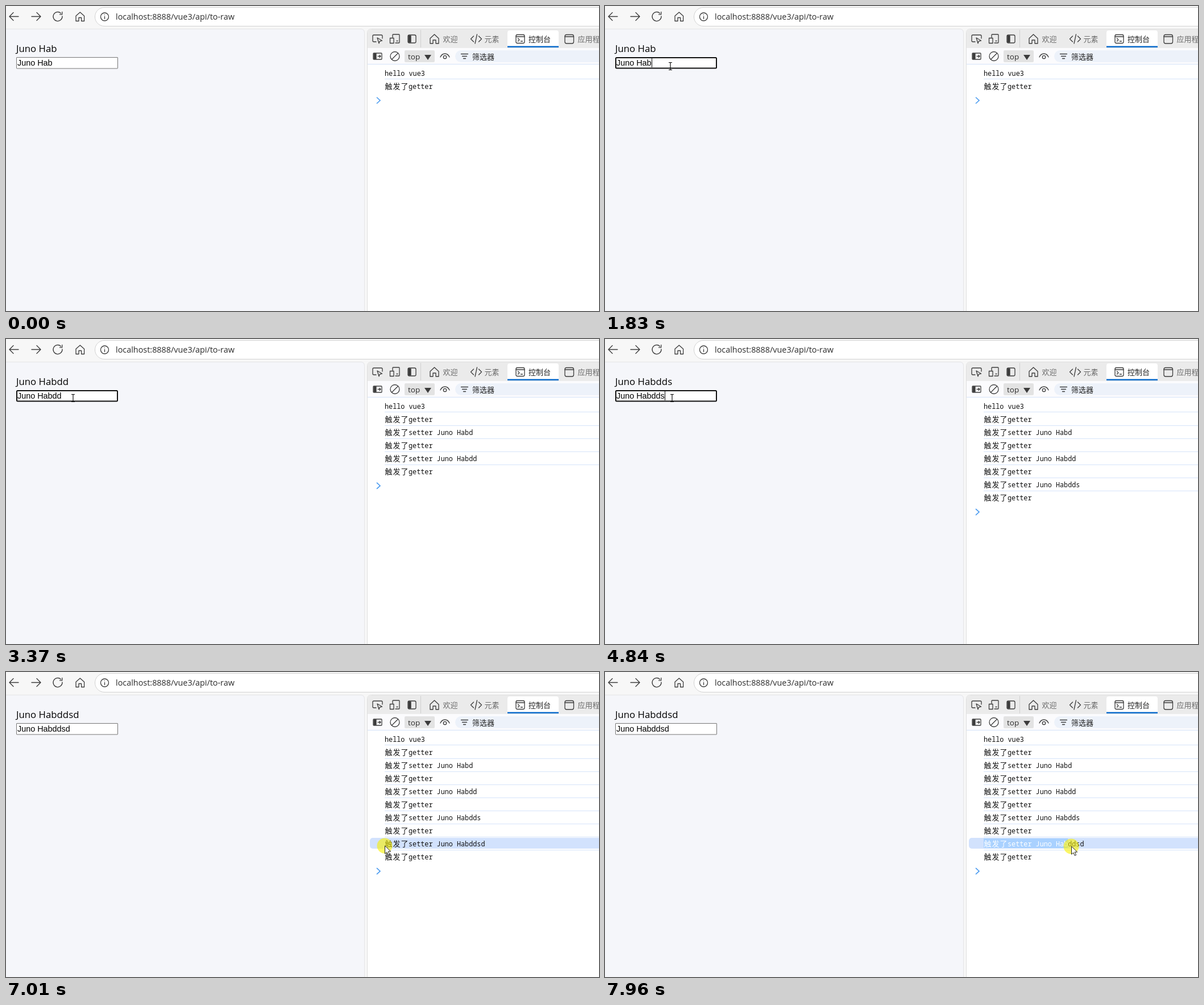
Write an HTML page that moves like this. It is 1043x537 px and loops after 8000 ms.

```html
<!DOCTYPE html>
<html lang="zh">
<head>
<meta charset="utf-8">
<title>to-raw</title>
<style>
html, body { margin: 0; width: 100%; height: 100%; overflow: hidden; background: #f7f7f7; }
svg { display: block; width: 1043px; height: 537px; }
text { fill: #111; white-space: pre; }
.ui { font: 14.4px "Open Sans", "Noto Sans", sans-serif; fill: #2c2c2c; }
.label { font: 16.8px "Open Sans", "Noto Sans", sans-serif; fill: #000; }
.field { font: 14.4px "Liberation Sans", Arial, sans-serif; fill: #000; }
.cn { font: 13px "Noto Sans CJK SC", "Noto Sans CJK", sans-serif; fill: #6a6a6a; }
.dark { fill: #222; }
.log { font: 11.8px "Noto Sans Mono", monospace; }
.han { font: 300 13px "Noto Sans CJK SC", "Noto Sans CJK", sans-serif; letter-spacing: 1px; }
.white text { fill: #fff; }
.icon { fill: none; stroke: #3c3c3c; stroke-width: 1.3; stroke-linecap: round; stroke-linejoin: round; }
</style>
</head>
<body>
<svg viewBox="0 0 1043 537">
  <rect width="1043" height="537" fill="#f7f7f7"/>
  <rect id="hover" x="75" y="2" width="34" height="34" rx="4" fill="#e8e8e8"/>
  <rect x="156.5" y="2.5" width="920" height="33" rx="16.5" fill="#fff" stroke="#d2d2d2"/>
  <g class="icon">
    <path d="M22 18.5H6m7-7-7 7 7 7M45 18.5h16m-7-7 7 7-7 7"/>
    <path id="reload" d="M99 18a8 8 0 1 1-2.5-5.3M98.8 10.5v4.3h-4.3"/>
    <path id="stop" d="M85 12.5l13 13m0-13-13 13"/>
    <path d="M123 17.5l7.3-6.5 7.3 6.5v9h-5v-6h-4.600v6h-5z"/>
    <circle cx="173.500" cy="19" r="7"/>
    <path d="M173.500 18.500v4m0-7v.1"/>
  </g>
  <text class="ui" x="193" y="24">localhost:8888/vue3/api/to-raw</text>

  <path d="M-1 40.500H624q6.500 0 6.500 7V538H-1z" fill="#f5f6fa" stroke="#e4e4e6"/>
  <text id="label" class="label" x="18" y="81"></text>
  <rect id="box" fill="#fff"/>
  <text id="field" class="field" x="20" y="105"></text>
  <rect id="caret" y="92" width="1" height="16"/>

  <path d="M635.500 538V48q0-7.500 7-7.500H1044V538z" fill="#fff" stroke="#dedede"/>
  <path d="M636 74V48q0-7 7-7H1043V74z" fill="#ebebeb"/>
  <path d="M882 73V47q0-4 4-4h82q4 0 4 4v26z" fill="#fff"/>
  <rect x="882" y="70.500" width="90" height="2.500" fill="#0b6bcb"/>
  <rect x="636" y="74" width="407" height="28" fill="#fbfbfd"/>
  <path d="M636 102.500H1043" stroke="#d5e3f8"/>
  <path d="M729.500 42v31" stroke="#cfcfcf"/>
  <rect x="701" y="78" width="53" height="21" rx="2" fill="#e3e3e3"/>
  <rect x="790" y="78" width="300" height="21" rx="10.500" fill="#edf2fa"/>
  <g class="icon">
    <path d="M651 63h-4q-2 0-2-2v-8q0-2 2-2h13q2 0 2 2v4M653 56l8.500 5-4 .8-1.500 4z"/>
    <path d="M680 55v-4q0-1 1-1h10q1 0 1 1v13q0 1-1 1h-6M675.500 56.500h6.500v9h-6.500zM687 61.500h2"/>
    <rect x="707" y="51" width="14" height="14" rx="2.500"/>
    <path d="M708 52.500h4v11h-4z" fill="#3c3c3c"/>
    <path d="M746 57l7.500-7 7.500 7v9h-5v-6h-5v6h-5z"/>
    <path d="M822.500 53l-5 5 5 5m9-10 5 5-5 5m-3-13-3.500 16"/>
    <rect x="897" y="50.500" width="15" height="15" rx="2.500"/>
    <path d="M897 54h15m-11.500 3 2.500 2.500-2.500 2.500m5 0h3"/>
    <rect x="983" y="50.500" width="15.500" height="15.500" rx="3"/>
    <path d="M983 54h15.500"/>
    <rect x="646" y="83" width="15" height="11" rx="1"/>
    <path d="M647 84h4v9h-4z" fill="#3c3c3c"/>
    <path d="M654 88.500h5m-2-2 2 2-2 2"/>
    <circle cx="684" cy="88.500" r="8"/>
    <path d="M678.500 94l11-11"/>
    <path d="M764 90q2.500-6 8-6t8 6"/>
    <circle cx="772" cy="90" r="2.700"/>
    <path d="M800.500 84.500h12m-10 4h8m-6 4h4"/>
  </g>
  <path d="M736 86h12l-6 9z" fill="#3c3c3c"/>
  <text class="ui" x="707" y="93.500" style="font-size:13.500px">top</text>
  <text class="cn" x="768.500" y="62.500">欢迎</text>
  <text class="cn" x="841.500" y="62.500">元素</text>
  <text class="cn dark" x="919" y="62.500">控制台</text>
  <text class="cn" x="1005.500" y="62.500">应用程序</text>
  <text class="cn dark" x="820" y="93.500">筛选器</text>

  <rect id="rowHover" x="640" y="292" width="410" height="19" rx="5" fill="#d2e2fd"/>
  <g id="rows"></g>
  <rect id="mark" x="666" y="293" width="0" height="17" fill="#a9d1ff"/>
  <clipPath id="cut"><rect id="cutBox" x="666" y="290" width="0" height="24"/></clipPath>
  <g id="marked" class="white" clip-path="url(#cut)"></g>
  <path id="prompt" d="M652-5.500 658 0l-6 5.500" fill="none" stroke="#4a9bf0" stroke-width="1.600"/>

  <g id="arrow">
    <circle r="13.500" fill="#f8f000" fill-opacity=".6"/>
    <path d="M.5 0v14l3.300-3 2.400 5.200 2.400-1-2.400-5.200h4.500z" fill="#fff" stroke="#222"/>
  </g>
  <path id="beam" d="M-3-6.500h2.500l.5 1 .5-1H3M0-5.500v11M-3 6.500h2.500l.5-1 .5 1H3" fill="none" stroke="#111" stroke-width="1.200"/>
</svg>
<script>
const $ = id => document.getElementById(id);
const show = (id, on) => $(id).style.display = on ? '' : 'none';
const set = (el, attrs) => { for (const k in attrs) el.setAttribute(k, attrs[k]); };

const LOOP = 8000, TICK = 70, BLINK = 530, PITCH = 23.05, CHAR = 7.08;
const BASE = 'Juno Hab', TYPED = 'ddsd';
const KEYS = [2640, 2840, 3770, 4910];
const FOCUS = 1830, BLUR = 7010, CLICK = 950, CLEAR = 1160, LOADED = 1630;

// start, end, from x, y, to x, y, eased
const MOVES = [
  [120, 820, 908, 505, 94, 26, 1],
  [890, 890, 94, 26, 95, 25, 0],
  [1630, 1760, 94, 26, 115, 106, 0],
  [1830, 2370, 115, 106, 118, 104, 1],
  [5900, 6680, 118, 104, 690, 371, 1],
  [7010, 7220, 632, 306, 768, 307, 0],
  [7750, 7960, 768, 307, 820, 307, 0]
];

const rowY = i => 118 + PITCH * i;

function logText(i, text) {
  const y = rowY(i) + 4.5;
  return text === 'hello vue3'
    ? `<text class="log" x="666" y="${y}">${text}</text>`
    : `<text class="han" x="666.5" y="${y + .5}">触发了</text><text class="log" x="708" y="${y}">${text}</text>`;
}

const logs = ['hello vue3', 'getter'];
KEYS.forEach((_, i) => logs.push(`setter ${BASE}${TYPED.slice(0, i + 1)}`, 'getter'));
$('rows').innerHTML = logs.map((s, i) => {
  const y = Math.round(rowY(i) - 12.6) + .5;
  const line = i ? `<path d="M666 ${y}H1043" stroke="#d6e4fa"/>` : '';
  return `<g>${line}${logText(i, s)}</g>`;
}).join('');
$('marked').innerHTML = logText(8, logs[8]);

function pointer(t) {
  const m = MOVES.findLast(m => m[0] <= t);
  if (!m) return null;
  const [a, b, x0, y0, x1, y1, eased] = m;
  const n = Math.round((b - a) / TICK);
  const k = b > a ? Math.floor((t - a) / (b - a) * n + 1e-6) : 0;
  let p = Math.min(1, (k + 1) / (n + 1));
  if (eased) p = (1 - Math.cos(Math.PI * p)) / 2;
  return [x0 + (x1 - x0) * p, y0 + (y1 - y0) * p];
}

function drawPointer(p, t) {
  const inField = p && p[0] > 18 && p[0] < 197 && p[1] > 90 && p[1] < 111;
  show('arrow', p && !inField);
  show('beam', inField);
  show('hover', p && t < 890 && p[0] > 75 && p[0] < 109 && p[1] < 36);
  if (p) set($(inField ? 'beam' : 'arrow'), { transform: `translate(${p.map(Math.round)})` });
}

function drawPage(t, typed) {
  const text = BASE + TYPED.slice(0, typed);
  $('label').textContent = $('field').textContent = text;
  const focused = t >= FOCUS && t < BLUR;
  set($('box'), focused
    ? { x: 19, y: 91, width: 177, height: 18.5, rx: 1.5, stroke: '#101010', 'stroke-width': 2 }
    : { x: 18.5, y: 90.5, width: 178, height: 19.5, rx: .5, stroke: '#767676', 'stroke-width': 1 });
  const since = t - (typed ? KEYS[typed - 1] : FOCUS);
  show('caret', focused && Math.floor(since / BLINK) % 2 === 0);
  set($('caret'), { x: Math.round(20 + $('field').getComputedTextLength()) });
  const loading = t >= CLICK && t < LOADED;
  show('reload', !loading);
  show('stop', loading);
}

function drawConsole(t, typed, p) {
  const count = t >= CLEAR && t < LOADED ? 0 : 2 + 2 * typed;
  [...$('rows').children].forEach((row, i) => row.style.display = i < count ? '' : 'none');
  set($('prompt'), { transform: `translate(0 ${rowY(count - 1) + 25.2})` });
  show('rowHover', t >= BLUR);
  let width = 0;
  if (t >= BLUR) {
    const d = p[0] - 666;
    width = d < 42 ? Math.floor(d / 14) * 14 : 42 + Math.floor((d - 42) / CHAR) * CHAR;
  }
  set($('mark'), { width });
  set($('cutBox'), { width });
}

function draw(t) {
  const typed = KEYS.filter(k => k <= t).length;
  const p = pointer(t);
  drawPage(t, typed);
  drawConsole(t, typed, p);
  drawPointer(p, t);
}

const start = performance.now();
function frame() {
  draw((performance.now() - start) % LOOP);
  requestAnimationFrame(frame);
}
frame();
</script>
</body>
</html>
```
